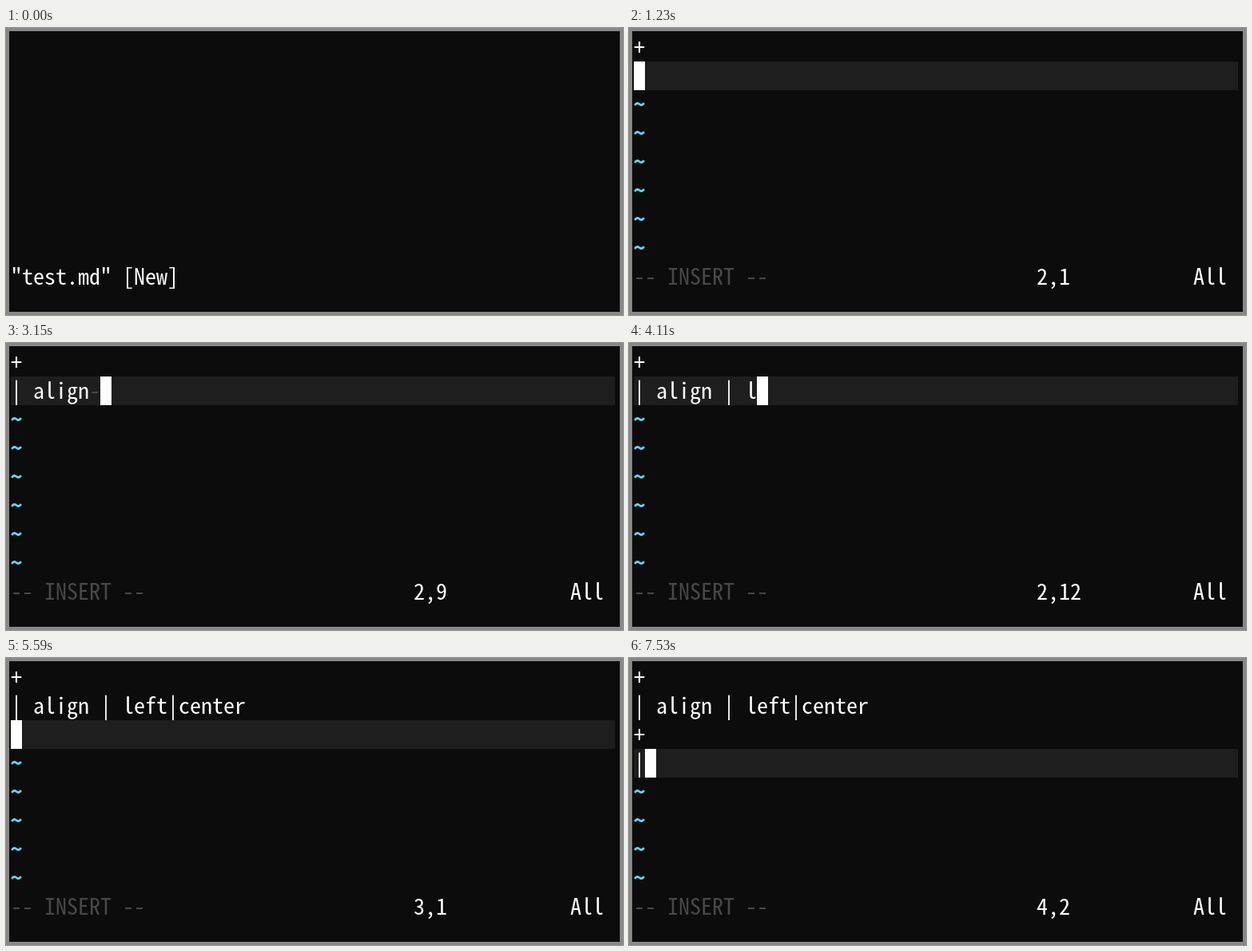
Recreate the animation shown at these times as an HTML page with a canvas. Size 772x360 px, loop 8000 ms.

```html
<!DOCTYPE html>
<html lang="en">
<head>
<meta charset="utf-8">
<title>Typing a table</title>
<style>
html, body { margin: 0; width: 100%; height: 100%; overflow: hidden; background: #0c0c0c; }
canvas { display: block; }
</style>
</head>
<body>
<canvas id="stage" width="772" height="360"></canvas>
<script>
const ctx = document.getElementById('stage').getContext('2d');
const LOOP = 8000, CELL = 14, ROW = 36, LEFT = 6, TOP = 6;
const COLS = 54, ROWS = 8, BASELINE = 28;
const OPEN_AT = 100, INSERT_AT = 620;
const COLOR = {
  back: '#0c0c0c', frame: '#888888', line: '#1e1e1e',
  text: '#ffffff', dim: '#484848', tilde: '#5fd7ff'
};
const FAMILY = '"Noto Sans Mono CJK JP", "Noto Sans Mono CJK SC", "Noto Sans Mono", monospace';

// Keystrokes as [time, key]; \n is Enter and \b is Backspace.
const KEYS = [
  [1040, '+'], [1230, '\n'], [1670, '|'],
  [2050, ' '], [2130, 'a'], [2220, 'l'], [2270, 'i'], [2350, 'g'], [2420, 'n'],
  [3150, ' '], [3290, '|'], [3500, ' '], [3690, 'l'], [3860, 'f'], [4110, '\b'],
  [4170, 'e'], [4220, 'f'], [4400, 't'], [4700, '|'],
  [4970, 'c'], [5050, 'e'], [5140, 'n'], [5230, 't'], [5310, 'e'], [5400, 'r'],
  [5590, '\n'], [6870, '+'], [7190, '\n'], [7530, '|']
];

// Pick the font size whose advance fills one terminal cell.
ctx.font = `100px ${FAMILY}`;
const fontSize = 100 * CELL / ctx.measureText('n').width;

function write(text, col, row, color = COLOR.text, weight = 400) {
  ctx.font = `${weight} ${fontSize}px ${FAMILY}`;
  ctx.fillStyle = color;
  [...text].forEach((char, i) =>
    ctx.fillText(char, LEFT + (col + i + 0.5) * CELL, TOP + row * ROW + BASELINE));
}

function fillCells(col, row, count, color) {
  ctx.fillStyle = color;
  ctx.fillRect(LEFT + col * CELL, TOP + row * ROW, count * CELL, ROW);
}

function linesAt(time) {
  let text = '';
  for (const [at, key] of KEYS) {
    if (at > time) break;
    text = key === '\b' ? text.slice(0, -1) : text + key;
  }
  return text.split('\n');
}

function drawEditor(time) {
  const lines = linesAt(time);
  const row = lines.length - 1, col = lines[row].length;
  const cursorHidden = time >= 1040 && time < 1230;

  fillCells(0, row, COLS, COLOR.line);
  lines.forEach((line, i) => write(line, 0, i));
  if (lines[row].endsWith(' ')) write('-', col - 1, row, COLOR.dim);
  for (let i = row + 1; i < ROWS; i++) write('~', 0, i, COLOR.tilde, 700);
  if (!cursorHidden) fillCells(col, row, 1, COLOR.text);

  write(time < INSERT_AT ? '0,0-1' : `${row + 1},${col + 1}`, 36, ROWS);
  write('All', 50, ROWS);
}

function draw(time) {
  ctx.fillStyle = COLOR.frame;
  ctx.fillRect(0, 0, 772, 360);
  ctx.fillStyle = COLOR.back;
  ctx.fillRect(4, 4, 764, 352);
  ctx.textAlign = 'center';

  if (time >= OPEN_AT) drawEditor(time);
  if (time < INSERT_AT) write('"test.md" [New]', 0, ROWS);
  else write('-- INSERT --', 0, ROWS, COLOR.dim);
}

const start = performance.now();
function tick() {
  draw((performance.now() - start) % LOOP);
  requestAnimationFrame(tick);
}
tick();
</script>
</body>
</html>
```
